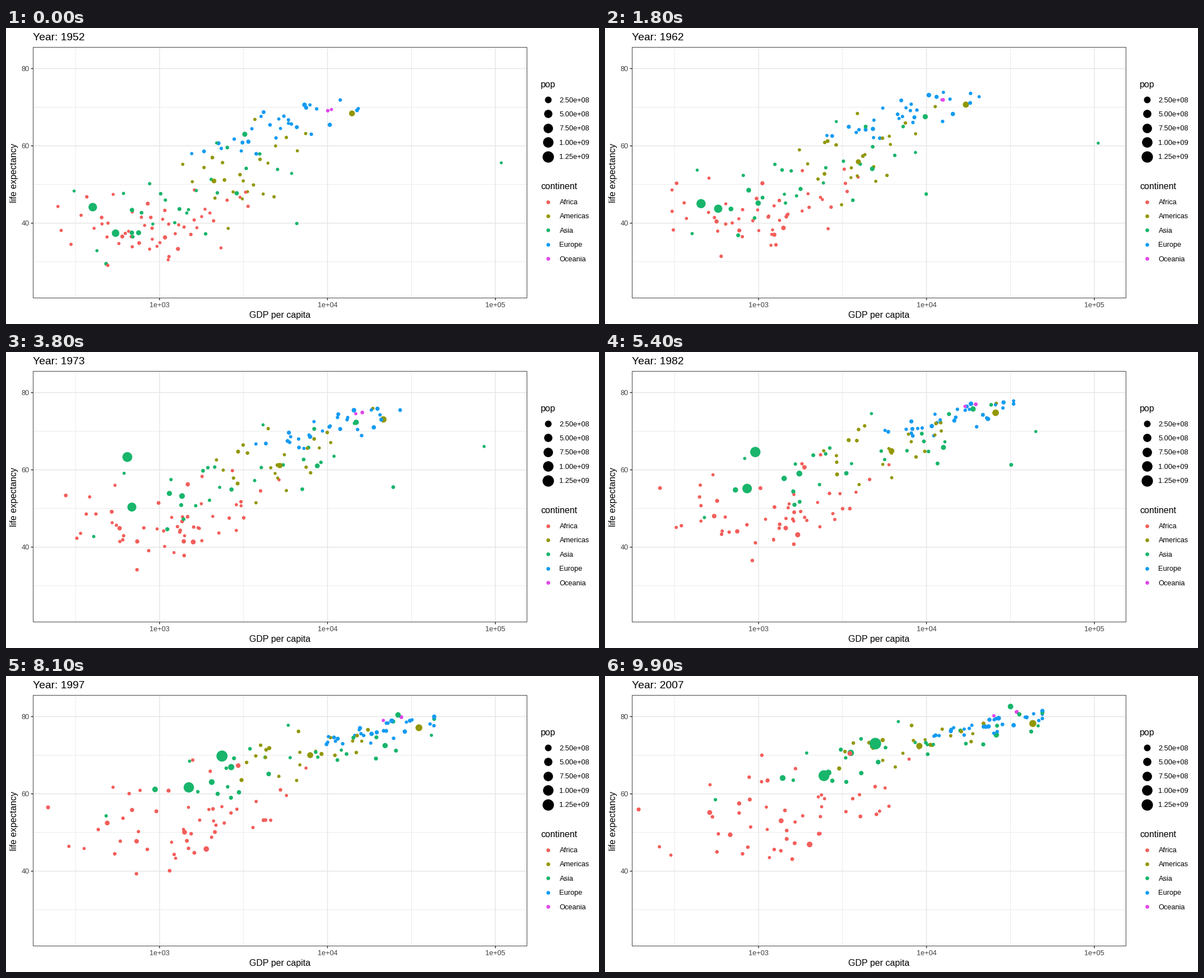
Recreate the animation shown at these times as a matplotlib script. Size 1058 by 529 pixels, loop 10000 ms.

```python
import numpy as np
import matplotlib.pyplot as plt
from matplotlib.animation import FuncAnimation
from matplotlib.patches import Rectangle

W, H, DPI = 1058, 529, 64
FRAMES, STEPS = 100, 9               # nine frames for every five years
YEARS = np.arange(1952, 2008, 5)
T = (YEARS - 1952) / 55
RISE = (T + np.sin(np.pi / 2 * T)) / 2   # life expectancy gains slow down
COLORS = {"Africa": "#f35e5a", "Americas": "#929705", "Asia": "#18b56b",
          "Europe": "#149bf2", "Oceania": "#e146ea"}
INK, AXIS, GRID, EDGE = "#000000", "#404040", "#e6e6e6", "#333333"
L, R, TOP, BOTTOM = 48.5, 929.5, 34.5, 482.5

plt.rcParams["font.family"] = "Liberation Sans"
plt.rcParams["path.snap"] = False
rng = np.random.default_rng(12)
dots = []                            # colour, log income, life, population


def px(lg):
    return 274 + 299.6 * (lg - 3)


def py(life):
    return 72.5 + 6.905 * (80 - life)


def radius(pop):
    """Radius in pixels, area growing with population."""
    share = np.clip((pop - 6e4) / 1.3187e9, 0, 1)
    return 2.58 + 7.76 * np.sqrt(share)


def marker(r):
    return (2 * r * 72 / DPI) ** 2


def mix(pair, t):
    return pair[0] + (pair[1] - pair[0]) * t


def bell_ranks(n):
    """Evenly filled bell curve in random order."""
    u = (rng.permutation(n) + 0.5) / n
    return np.clip(np.log(u / (1 - u)) / 1.7, -1.9, 1.9)


def crowd(cont, n, pop, growth, income, width, life, slope, spread):
    """Small dots around a trend line; each pair is a value in 1952 and 2007."""
    x0, x1, z0, z1 = (bell_ranks(n)[:, None] for _ in range(4))
    turn = 0.9 * T
    dev = mix(width, T) * (x0 * np.cos(turn) + x1 * np.sin(turn))
    dev += rng.normal(0, 0.015, dev.shape)
    z = z0 * np.cos(turn) + z1 * np.sin(turn)
    lg = np.minimum(mix(income, RISE) + dev, 4.2 + 0.49 * RISE)
    age = mix(life, RISE) + mix(slope, T) * dev + mix(spread, T) * z
    age = np.minimum(age, 73 + 9 * T - 0.6 * np.abs(z))
    size = pop * 1e6 * 10 ** np.clip(rng.normal(0, 0.42, n), -1, 0.9)
    for i in range(n):
        dots.append((COLORS[cont], lg[i], age[i], size[i] * mix((1, growth), T)))


def mover(cont, pop, start, end, power=1, bumps=()):
    """One dot from start to end (income, life), with bell-shaped detours."""
    lg = mix(np.log10([start[0], end[0]]), T ** power)
    life = mix((start[1], end[1]), RISE)
    for year, width, d_lg, d_life in bumps:
        bell = np.exp(-((YEARS - year) / width) ** 2 / 2)
        lg, life = lg + d_lg * bell, life + d_life * bell
    dots.append((COLORS[cont], lg, life, mix(pop, T) * 1e6))


crowd("Africa", 50, 2.8, 3.2, (2.97, 3.17), (0.29, 0.40), (39.3, 55), (4, 9), (4.8, 7))
crowd("Americas", 23, 3.2, 2.6, (3.50, 3.94), (0.20, 0.28), (53, 73.5), (22, 9), (6.5, 2.4))
crowd("Asia", 25, 5, 2.9, (3.15, 3.85), (0.34, 0.46), (46.5, 71.5), (10, 8), (6.5, 3))
crowd("Europe", 30, 9, 1.25, (3.70, 4.40), (0.26, 0.25), (65, 78), (14, 7), (2.8, 1.1))

# large dots and outliers
mover("Asia", (556, 1319), (400, 44), (4959, 73), 1.75,
      [(1961, 2.5, 0, -9), (1971, 7, 0, 6)])
mover("Asia", (372, 1110), (547, 37.4), (2452, 64.7), 2)
mover("Asia", (82, 224), (750, 37.5), (3541, 70.6))
mover("Asia", (86, 127), (3217, 63), (31656, 82.6), 0.42)
mover("Asia", (41, 169), (685, 43.4), (2606, 65.5))
mover("Asia", (47, 150), (684, 37.5), (1391, 64.1), 4)
mover("Asia", (0.2, 2.5), (108382, 55.6), (47307, 77.6), 2, [(1988, 7, -0.4, 0)])
mover("Asia", (4, 28), (6460, 39.9), (21655, 72.8), 1, [(1978, 9, 0.45, 0)])
mover("Americas", (158, 301), (13990, 68.4), (42952, 78.2))
mover("Americas", (57, 190), (2109, 50.9), (9066, 72.4), 0.5)
mover("Africa", (33, 135), (1077, 36.3), (2014, 46.9), 0.5)
mover("Africa", (2.5, 8.9), (493, 40), (863, 46.2), 1, [(1992, 3.2, -0.1, -21)])
mover("Oceania", (8.7, 20), (10040, 69.1), (34435, 81.2))
mover("Oceania", (2, 4), (10557, 69.4), (25185, 80.2))

dots = [dots[i] for i in rng.permutation(len(dots))]
LG, LIFE, POP = (np.array([d[k] for d in dots]) for k in (1, 2, 3))
X, Y, SIZE = px(LG), py(LIFE), marker(radius(POP))

fig = plt.figure(figsize=(W / DPI, H / DPI), dpi=DPI, facecolor="white")
ax = fig.add_axes([0, 0, 1, 1])
ax.set(xlim=(0, W), ylim=(H, 0))
ax.axis("off")


def line(xs, ys, color, width):
    ax.plot(xs, ys, color=color, lw=width * 72 / DPI, zorder=1,
            solid_capstyle="butt", snap=False)


def text(x, y, s, size, color=INK, **kw):
    return ax.text(x, y, s, fontsize=size * 72 / DPI, color=color,
                   va="baseline", **kw)


def legend(y, name, entries):
    """Heading with one row per (label, radius, colour)."""
    text(954, y, name, 16)
    for i, (label, r, color) in enumerate(entries):
        row = y + 22.2 + 25.4 * i
        ax.scatter([967], [row], s=marker(r), c=color, linewidths=0)
        text(987.5, row + 4.6, label, 12.8)


for lg in np.arange(2.5, 5.1, 0.5):
    major = lg % 1 == 0
    line([px(lg)] * 2, [TOP, BOTTOM], GRID, 1.5 if major else 0.8)
    if major:
        line([px(lg)] * 2, [BOTTOM, BOTTOM + 4], EDGE, 1.5)
        text(px(lg), 499, f"1e+0{lg:.0f}", 12.8, AXIS, ha="center")
for life in range(30, 81, 10):
    major = life % 20 == 0
    line([L, R], [py(life)] * 2, GRID, 1.5 if major else 0.8)
    if major:
        line([L - 4, L], [py(life)] * 2, EDGE, 1.5)
        text(42, py(life) + 4.6, str(life), 12.8, AXIS, ha="right")
ax.add_patch(Rectangle((L, TOP), R - L, BOTTOM - TOP, fill=False, ec="#444444",
                       lw=72 / DPI, zorder=4, snap=False))

text(489, 518, "GDP per capita", 16, ha="center")
text(19.5, 258.5, "life expectancy", 16, ha="center", rotation=90,
     rotation_mode="anchor")
legend(105.8, "pop", [(f"{p:.2e}", radius(p), INK) for p in 2.5e8 * np.arange(1, 6)])
legend(288.3, "continent", [(name, 3.36, c) for name, c in COLORS.items()])

title = text(48.5, 22, "", 19.2)
cloud = ax.scatter(X[:, 0], Y[:, 0], s=SIZE[:, 0], c=[d[0] for d in dots],
                   linewidths=0, zorder=3)


def draw(frame):
    k, part = divmod(frame, STEPS)
    nxt = min(k + 1, len(YEARS) - 1)
    x, y, s = (mix((a[:, k], a[:, nxt]), part / STEPS) for a in (X, Y, SIZE))
    cloud.set_offsets(np.column_stack([x, y]))
    cloud.set_sizes(s)
    title.set_text(f"Year: {round(1952 + 5 * frame / STEPS)}")
    return cloud, title


anim = FuncAnimation(fig, draw, frames=FRAMES, init_func=lambda: draw(0),
                     interval=100, repeat=True, repeat_delay=0)
plt.show()
```
